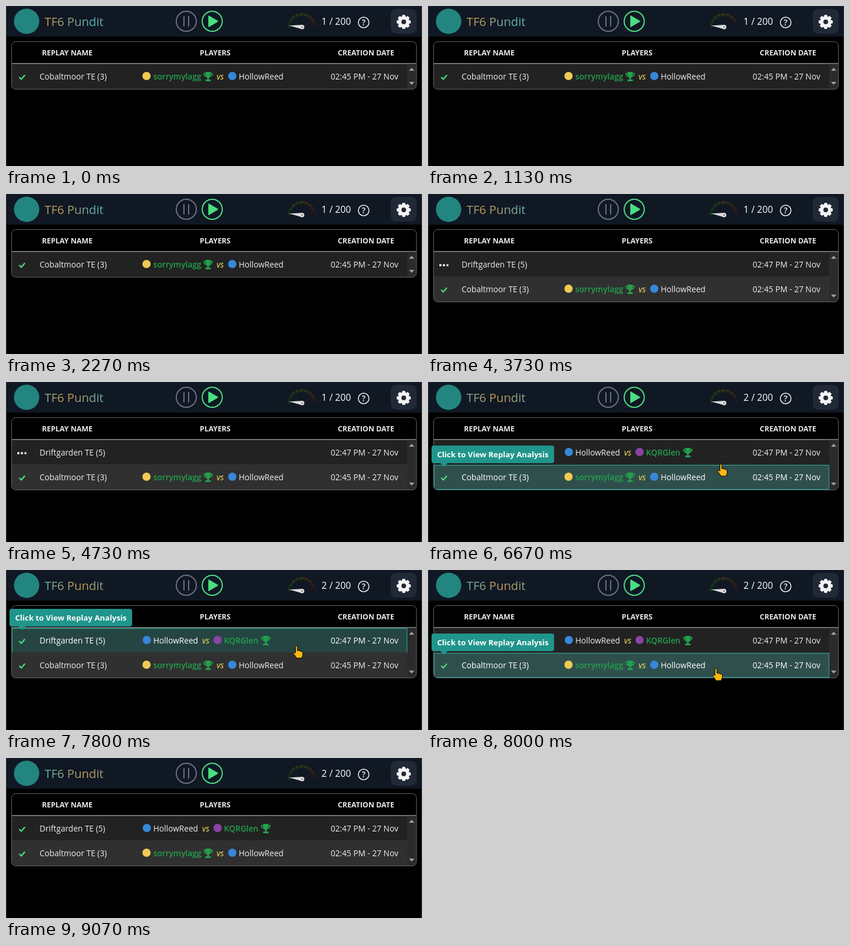
Animation of 706x272 px, one loop 9.14 s. Source, as an HTML page:

```html
<!DOCTYPE html>
<html lang="en">
<head>
<meta charset="utf-8">
<title>Replay list</title>
<style>
  html, body { margin: 0; width: 100%; height: 100%; overflow: hidden; background: #000; }
  svg { display: block; width: 706px; height: 272px; font-family: "Open Sans", "Noto Sans", sans-serif; }
  .cell { font-size: 13.67px; fill: #eee; }
  .hover .cell { fill: #fff; }
  .cell.win { font-weight: 600; fill: #22a04c; }
  .cell.vs { font-style: italic; fill: #fde368; }
  .hover .cell.win { fill: #22a04c; }
  .hover .cell.vs { fill: #fde368; }
  .head { font-size: 12.4px; font-weight: 700; fill: #e8e8e8; text-anchor: middle; }
  .check { fill: none; stroke: #4ade80; stroke-width: 2.2; stroke-linecap: round; stroke-linejoin: round; }
</style>
</head>
<body>
<svg id="stage" viewBox="0 0 706 272">
  <defs>
    <linearGradient id="shine" gradientUnits="userSpaceOnUse" spreadMethod="reflect">
      <stop offset="0" stop-color="#4fb3b8"/>
      <stop offset=".5" stop-color="#c8954c"/>
      <stop offset="1" stop-color="#4fb3b8"/>
    </linearGradient>
    <clipPath id="frameClip"><rect id="clipBox" x="9.5" y="60.5" width="687" rx="7"/></clipPath>
    <path id="trophy" fill="#22a04c" d="M-4.5-8h9v2H8c0 4-1.5 6-4.8 6.500C2.600 1.600 2 2.300 1.300 2.700V5H4.500V8h-9V5h3.200V2.700C-2 2.300-2.600 1.600-3.200.500-6.500 0-8-2-8-6h3.500zM-4.600-4.400h-1.700c.2 1.800.9 2.700 2.100 3.100zM4.600-4.400 4.200-1.300C5.400-1.700 6.100-2.600 6.300-4.400z"/>
  </defs>

  <rect width="706" height="272"/>
  <rect width="706" height="52" fill="#101824"/>
  <path d="M.500 0V272M705.500 0V272" stroke="#333"/>
  <circle cx="35" cy="26" r="21.500" fill="#23857f"/>
  <text x="65.500" y="34" font-size="20.200" fill="url(#shine)">TF6 Pundit</text>

  <g fill="none" stroke-width="2" stroke-linecap="round">
    <circle cx="306" cy="26" r="17" stroke="#6b7080"/>
    <path d="M302 18V34M310 18V34" stroke="#6b7080"/>
    <circle cx="350" cy="26" r="17" stroke="#4ade80"/>
  </g>
  <path d="M344.300 17.300 359.200 26 344.300 34.700z" fill="#4ade80" stroke="#4ade80" stroke-width="2" stroke-linejoin="round"/>

  <g id="gauge" fill="none" stroke-width="4.500"></g>
  <path d="M480.500 33.300 503 32V39.500z" fill="#dcdcdc"/>
  <circle cx="502.500" cy="35.700" r="3.800" fill="#dcdcdc"/>
  <circle cx="502.500" cy="35.700" r="1" fill="#333"/>
  <text id="count" x="560.500" y="32" font-size="15.700" fill="#fff" text-anchor="middle"></text>
  <circle cx="607" cy="28" r="9" fill="none" stroke="#f2f2f2" stroke-width="1.500"/>
  <text x="607" y="33" font-size="14" font-weight="600" fill="#f2f2f2" text-anchor="middle">?</text>

  <rect x="653" y="5" width="44" height="42" rx="9" fill="#212936"/>
  <g id="gear" fill="#f4f4f4" stroke="#f4f4f4" stroke-linejoin="round"></g>

  <g clip-path="url(#frameClip)">
    <g id="rows"></g>
    <rect x="681" y="99" width="16" height="85" fill="#2b2b2b"/>
    <path d="M684 110h9l-4.500-5z" fill="#a0a0a0"/>
    <path id="down" d="M684 0h9l-4.500 5z" fill="#a0a0a0"/>
  </g>
  <path d="M10 97.750H696" stroke="#8c8c8c" stroke-width="1.500"/>
  <rect id="frame" x="9.500" y="60.500" width="687" rx="7" fill="none" stroke="#626262"/>
  <text class="head" x="104" y="84">REPLAY NAME</text>
  <text class="head" x="355" y="84">PLAYERS</text>
  <text class="head" x="611" y="84">CREATION DATE</text>

  <g id="tip">
    <path d="M20 29h14l-7 7z" fill="#20958b"/>
    <rect x="6" width="208" height="30" rx="4" fill="#20958b"/>
    <text x="110" y="20" font-size="13.200" font-weight="700" fill="#fff" text-anchor="middle">Click to View Replay Analysis</text>
  </g>
  <g id="cursor" stroke="#000" stroke-linejoin="round">
    <path id="hand" fill="#fdb714" d="M-1.700 0C-1.700-2 1.700-2 1.700 0V6.500C2.500 5.300 4.700 5.500 4.900 7 6 6 7.800 6.500 8 8 9.300 7.200 10.800 8 10.800 9.600V13C10.800 15 9.300 16 9.100 18.800H-.200C-.500 16-3.800 13.500-5 11.200-6 9-3.500 8-1.700 10.200z"/>
    <path id="arrow" fill="#fff" d="M0 0V16.500L4 13 6.600 18.800 9 17.700 6.500 12H11.500z"/>
  </g>
</svg>
<script>
  const LOOP = 9140, ADDED = 3300, DONE = 5100;
  const GOLD = "#efcb55", BLUE = "#3787dc", PURPLE = "#8b43a6";
  const $ = id => document.getElementById(id);
  const clamp = v => Math.max(0, Math.min(1, v));
  const ease = v => { v = clamp(v); return v * v * (3 - 2 * v); };
  const set = (el, attrs) => { for (const k in attrs) el.setAttribute(k, attrs[k]); };
  const show = (el, on) => el.setAttribute("visibility", on ? "inherit" : "hidden");

  const cell = (x, text, kind = "") => `<text class="cell ${kind}" x="${x}" y="26">${text}</text>`;
  const badge = (x, color) => `<circle cx="${x}" cy="20" r="7" fill="${color}"/>`;
  const cup = x => `<use href="#trophy" x="${x}" y="21"/>`;

  function row(id, name, date, players) {
    return `<g id="${id}">
      <rect class="bg" x="10" y="-1" width="671" height="43"/>
      <rect class="glow" x="10.500" y=".500" width="670" height="41" fill="#2caca0" fill-opacity=".25" stroke="#25aaa0"/>
      <g class="words">${cell(57, name)}${cell(551, date)}</g>
      <g class="dots" fill="#fff">${[21, 27, 33].map(x => `<circle cx="${x}" cy="22" r="2"/>`).join("")}</g>
      <g class="result"><path class="check" d="M23 22.500 26 25.500 31.500 19"/>${players}</g>
    </g>`;
  }

  $("rows").innerHTML =
    row("fresh", "Driftgarden TE (5)", "02:47 PM - 27 Nov",
      badge(239, BLUE) + cell(250, "HollowReed") + cell(333, "vs", "vs") +
      badge(359, PURPLE) + cell(370, "KQRGlen", "win") + cup(441)) +
    row("old", "Cobaltmoor TE (3)", "02:45 PM - 27 Nov",
      badge(238.5, GOLD) + cell(250, "sorrymylagg", "win") + cup(343) +
      cell(357.5, "vs", "vs") + badge(384, BLUE) + cell(395, "HollowReed"));

  const part = (id, name) => $(id).querySelector("." + name);
  const dots = [...part("fresh", "dots").children];
  show(part("old", "dots"), false);

  // Gauge segments run from green to red
  const polar = (r, a) => `${502 + r * Math.cos(a)} ${36 + r * Math.sin(a)}`;
  $("gauge").innerHTML = Array.from({ length: 9 }, (_, i) => {
    const a = Math.PI * (1 + i / 9), b = a + Math.PI / 9 - 0.06;
    return `<path d="M${polar(21.7, a)}A21.7 21.7 0 0 1 ${polar(21.7, b)}" stroke="hsl(${130 - i * 16} 42% 14%)"/>`;
  }).join("");

  $("gear").innerHTML = Array.from({ length: 8 }, (_, i) =>
    `<path d="M-2.800-8-2-11.400H2L2.800-8z" transform="rotate(${i * 45})"/>`).join("") +
    `<circle r="6.700" fill="none" stroke-width="5.400"/>`;

  // Pointer stops: time, x, y
  const path = [
    [5670, 672, 170], [6300, 540, 158], [6670, 497, 141.2], [7050, 497, 141.2],
    [7250, 493, 131], [7800, 493, 131], [8320, 480, 246]
  ];

  function pointer(t) {
    const n = path.findIndex(p => p[0] > t);
    if (n < 1) return null;
    const [t0, x0, y0] = path[n - 1], [t1, x1, y1] = path[n];
    const k = ease((t - t0) / (t1 - t0));
    return { x: x0 + (x1 - x0) * k, y: y0 + (y1 - y0) * k };
  }

  function drawRow(id, y, bg, hover) {
    set($(id), { transform: `translate(0 ${y})`, class: hover ? "hover" : "" });
    set(part(id, "bg"), { fill: bg });
    show(part(id, "glow"), hover);
  }

  function draw(t) {
    const added = t >= ADDED, done = t >= DONE;
    const height = added ? 123 : 81;
    const peak = 70 + 65 * t / LOOP;
    set($("shine"), { x1: peak - 75, x2: peak + 75 });
    $("count").textContent = (done ? 2 : 1) + " / 200";
    set($("gear"), { transform: `translate(675 27) rotate(${90 * ease((t - 5350) / 700)})` });

    set($("frame"), { height });
    set($("clipBox"), { height });
    set($("down"), { transform: `translate(0 ${added ? 171 : 129})` });

    const p = pointer(t);
    const onRow = p && t > 5740 && p.y < 183 ? (p.y >= 141 ? 2 : 1) : 0;
    drawRow("old", added ? 141 : 99, added ? "#303030" : "#222", onRow === 2);
    drawRow("fresh", 99, "#222", onRow === 1);
    show($("fresh"), added);
    show(part("fresh", "dots"), !done);
    show(part("fresh", "result"), done);
    set($("fresh"), { opacity: done ? 0.5 + 0.5 * ease((t - DONE) / 300) : 1 });
    set(part("fresh", "words"), { opacity: ease((t - ADDED) / 450) });
    dots.forEach((d, i) => set(d, { opacity: 0.8 + 0.2 * Math.cos((t - 3730) / 160 - i * 0.8) }));

    show($("tip"), onRow > 0);
    set($("tip"), { transform: `translate(0 ${onRow === 2 ? 108 : 66})` });
    show($("cursor"), !!p);
    if (p) {
      set($("cursor"), { transform: `translate(${p.x} ${p.y})` });
      show($("hand"), p.y < 183);
      show($("arrow"), p.y >= 183);
    }
  }

  const start = performance.now();
  function tick() {
    draw((performance.now() - start) % LOOP);
    requestAnimationFrame(tick);
  }
  tick();
</script>
</body>
</html>
```
